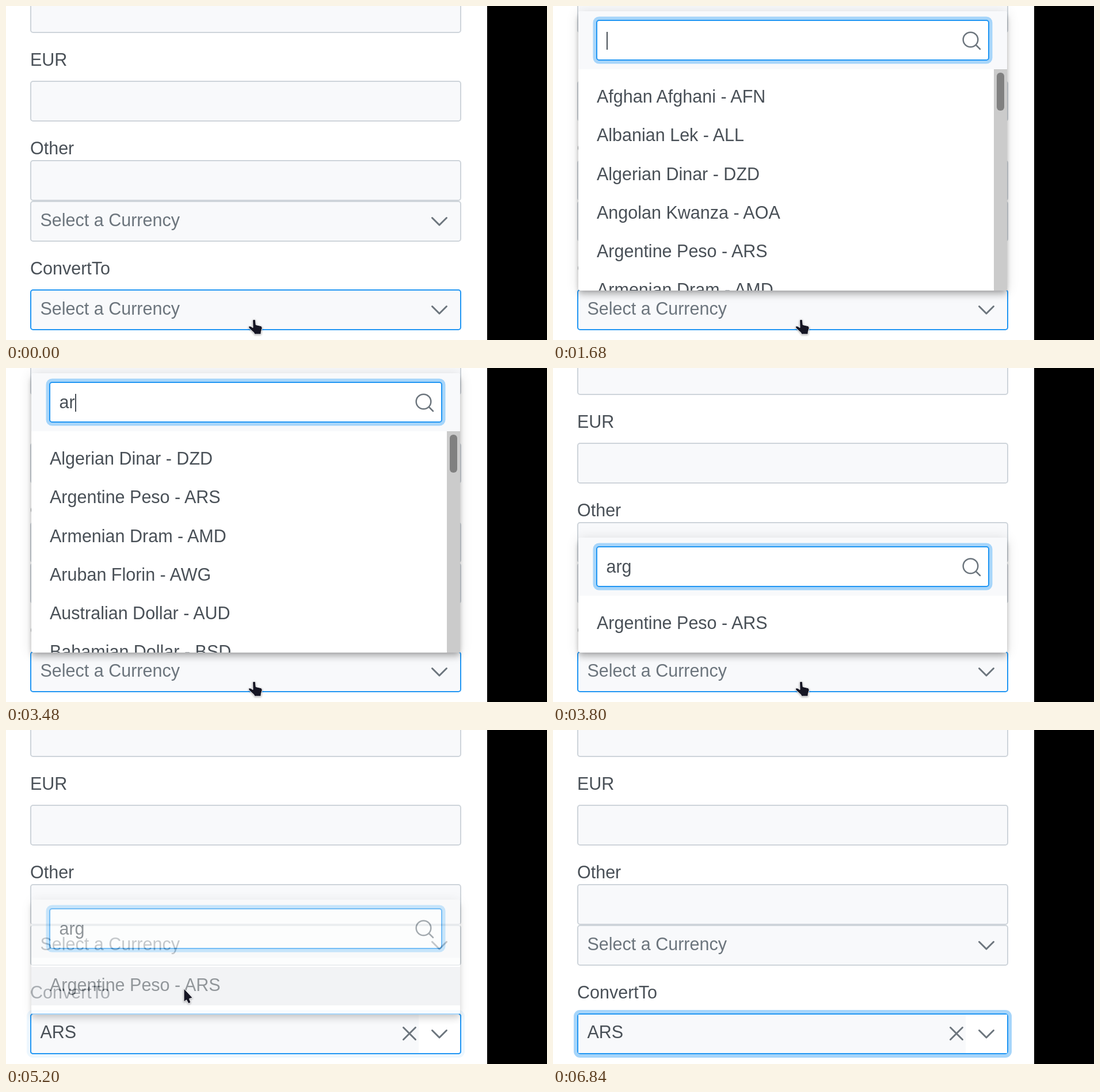
These frames come from a looping animation (940x581 px, 6880 ms). An HTML page:

```html
<!DOCTYPE html>
<html lang="en">
<head>
<meta charset="utf-8">
<title>Currency select</title>
<style>
html, body { margin: 0; width: 100%; height: 100%; overflow: hidden; background: #000; }
#page { position: absolute; left: 0; top: 0; width: 836px; height: 581px; overflow: hidden; background: #fff; }
#page div, p, svg { position: absolute; box-sizing: border-box; }
p { margin: 0; font: 30.5px/34px "Liberation Sans", Arial, sans-serif; color: #495057; white-space: pre; }
svg { left: 0; top: 0; overflow: visible; fill: none; stroke: #6c757d; stroke-width: 3; stroke-linecap: round; stroke-linejoin: round; }

.field { left: 42px; width: 749px; height: 71px; border: 2px solid #ced4da; border-radius: 5px; background: #f8f9fb; }
.hint { color: #6c757d; left: 59.5px; }
.label { left: 42px; }
#target { top: 493px; border-color: #2196f3; }

.panel { left: 44px; top: 9px; width: 745px; background: #fff; border-radius: 4px; transform-origin: bottom;
  box-shadow: 0 4px 9px -2px rgba(0,0,0,.2), 0 9px 11px rgba(0,0,0,.14), 0 2px 22px rgba(0,0,0,.12); }
.head { left: 0; top: 0; width: 745px; height: 101px; background: #f8f9fb; border-radius: 4px 4px 0 0; }
.search { left: 31px; top: 15px; width: 683px; height: 71px; border: 2px solid #2196f3; border-radius: 5px;
  background: #fff; box-shadow: 0 0 0 5.5px #a6d5fa; }
.search p { left: 15.5px; top: 16px; }
.caret { width: 2px; height: 31px; top: 19px; background: #495057; }
.list { left: 0; top: 101px; width: 745px; height: 385px; overflow: hidden; }
.list p { left: 32px; }
.track { left: 722px; top: 101px; width: 23px; height: 385px; background: #cbcbcb; }
.thumb { left: 5px; top: 6px; width: 13px; height: 66px; border-radius: 6px; background: #808080; }
#tall { height: 486px; }
#short { height: 200px; }
#row { left: 0; top: 117px; width: 745px; height: 67px; background: #e9ecef; }
#short > p { left: 32px; top: 131px; }
#value { inset: 0; background: #f8f9fb; }
#value p { left: 15.5px; top: 13px; }
#open { right: 0; top: 0; width: 72px; height: 67px; background: #fff; }
.pointer { fill: #161624; stroke: #fff; stroke-width: 1; filter: drop-shadow(0 1px 1.5px rgba(0,0,0,.35)); }

/* One loop of 6880 ms drives every part */
#tall, #short, #row, #value, #glow, #rim, #hand, #arrow { animation: 6880ms linear infinite; }
.t { animation: 6880ms step-end infinite; }
#tall { animation-name: tall; }
#short { animation-name: short; }
#row { animation-name: row; }
#value { animation-name: value; }
#glow { animation-name: glow; left: 42px; top: 493px; width: 749px; height: 71px; border-radius: 5px; box-shadow: 0 0 0 6px #a6d5fa; }
#rim { animation-name: rim; left: 42px; top: 493px; width: 749px; height: 71px; border: 2px solid #2196f3; border-radius: 5px; }
#hand { animation-name: hand; }
#arrow { animation-name: arrow; }
#all { animation-name: all; }
#match { animation-name: match; }
#caret0 { animation-name: caret0; left: 16px; }
#type1 { animation-name: type1; }
#type2 { animation-name: type2; }

@keyframes tall {
  0%, 21.2% { opacity: 0; transform: scaleY(.8); animation-timing-function: cubic-bezier(0,0,.2,1); }
  24.3%, 54.63% { opacity: 1; transform: scaleY(1); }
  54.64%, 100% { opacity: 0; transform: scaleY(1); }
}
@keyframes short {
  0%, 54.63% { opacity: 0; transform: none; }
  54.64%, 55.21% { opacity: 1; transform: none; }
  55.22%, 74.8% { opacity: 1; transform: translateY(286px); }
  76.8%, 100% { opacity: 0; transform: translateY(286px); }
}
@keyframes row { 0%, 67.4% { opacity: 0; } 67.41%, 100% { opacity: 1; } }
@keyframes value { 0%, 74.97% { opacity: 0; } 74.98%, 100% { opacity: 1; } }
@keyframes glow { 0%, 74.9% { opacity: 0; } 78.3%, 100% { opacity: 1; } }
@keyframes rim { 0%, 74.97% { opacity: 0; } 74.98%, 99.4% { opacity: 1; } 99.41%, 100% { opacity: 0; } }
@keyframes hand {
  0%, 63% { opacity: 1; transform: translate(421px, 545px); animation-timing-function: ease-in-out; }
  70.3%, 74.97% { opacity: 1; transform: translate(299px, 450px); }
  74.98%, 100% { opacity: 0; transform: translate(299px, 450px); }
}
@keyframes arrow {
  0%, 74.97% { opacity: 0; transform: translate(309px, 450px); }
  74.98%, 88.5% { opacity: 1; transform: translate(309px, 450px); animation-timing-function: ease-in; }
  92.41% { opacity: 1; transform: translate(214px, 217px); }
  92.42%, 100% { opacity: 0; transform: translate(214px, 217px); }
}
@keyframes all { 0% { opacity: 1; } 50.57%, 100% { opacity: 0; } }
@keyframes match { 0% { opacity: 0; } 50.57%, 100% { opacity: 1; } }
@keyframes caret0 { 0% { opacity: 1; } 39.52%, 100% { opacity: 0; } }
@keyframes type1 { 0% { opacity: 0; } 45.92% { opacity: 1; } 50.57%, 100% { opacity: 0; } }
@keyframes type2 { 0% { opacity: 0; } 50.57%, 100% { opacity: 1; } }
</style>
</head>
<body>
<div id="page">
  <div class="field" style="top:-24px"></div>
  <p class="label" style="top:76px">EUR</p>
  <div class="field" style="top:130px"></div>
  <p class="label" style="top:230px">Other</p>
  <div class="field" style="top:268px"></div>
  <div class="field" style="top:339px"></div>
  <p class="hint" style="top:355px">Select a Currency</p>
  <svg><path d="M740.5 368.5L753 381L765.5 368.5"/></svg>
  <p class="label" style="top:439px">ConvertTo</p>

  <div id="glow"></div>
  <div class="field" id="target">
    <p class="hint" style="left:15.5px;top:14px">Select a Currency</p>
    <div id="value">
      <p>ARS</p>
      <div id="open"></div>
      <svg><path d="M646.5 22.5l21 21m0-21l-21 21"/></svg>
    </div>
    <svg><path d="M696.5 27.5L709 40L721.5 27.5"/></svg>
  </div>
  <div id="rim"></div>

  <div class="panel" id="tall">
    <div class="head">
      <div class="search">
        <div class="caret t" id="caret0"></div>
        <div class="t" id="type1"><p>a</p><div class="caret" style="left:33px"></div></div>
        <div class="t" id="type2"><p>ar</p><div class="caret" style="left:43px"></div></div>
        <svg class="lens"></svg>
      </div>
    </div>
    <div class="list t" id="all"></div>
    <div class="list t" id="match"></div>
    <div class="track"><div class="thumb"></div></div>
  </div>

  <div class="panel" id="short">
    <div class="head">
      <div class="search"><p>arg</p><svg class="lens"></svg></div>
    </div>
    <div id="row"></div>
    <p>Argentine Peso - ARS</p>
  </div>

  <svg class="pointer" id="hand" width="26" height="28"><path d="M10 0Q12.3 0 12.6 2.5L13.2 9.5L21.5 11.5Q24.5 12.4 24.2 15.5L22.3 22L22 26H10.5L10 23.5L1 15.2Q-.5 12.5 2 11.7Q4 11.5 8 14.5L7.6 2.5Q7.7 0 10 0Z"/></svg>
  <svg class="pointer" id="arrow" width="18" height="28"><path d="M0 0V23L4.5 19.5L8 26L12 24L9.5 17.5L15 16Z"/></svg>
</div>
<script>
const fill = (id, names) => {
  document.getElementById(id).innerHTML = names
    .map((name, i) => `<p style="top:${30 + Math.round(67.25 * i)}px">${name}</p>`).join("");
};
fill("all", ["Afghan Afghani - AFN", "Albanian Lek - ALL", "Algerian Dinar - DZD",
  "Angolan Kwanza - AOA", "Argentine Peso - ARS", "Armenian Dram - AMD"]);
fill("match", ["Algerian Dinar - DZD", "Argentine Peso - ARS", "Armenian Dram - AMD",
  "Aruban Florin - AWG", "Australian Dollar - AUD", "Bahamian Dollar - BSD"]);
for (const lens of document.querySelectorAll(".lens"))
  lens.innerHTML = '<g stroke-width="2.5"><circle cx="648.5" cy="32.5" r="12.8"/><path d="M658 42l7 7"/></g>';
</script>
</body>
</html>
```
